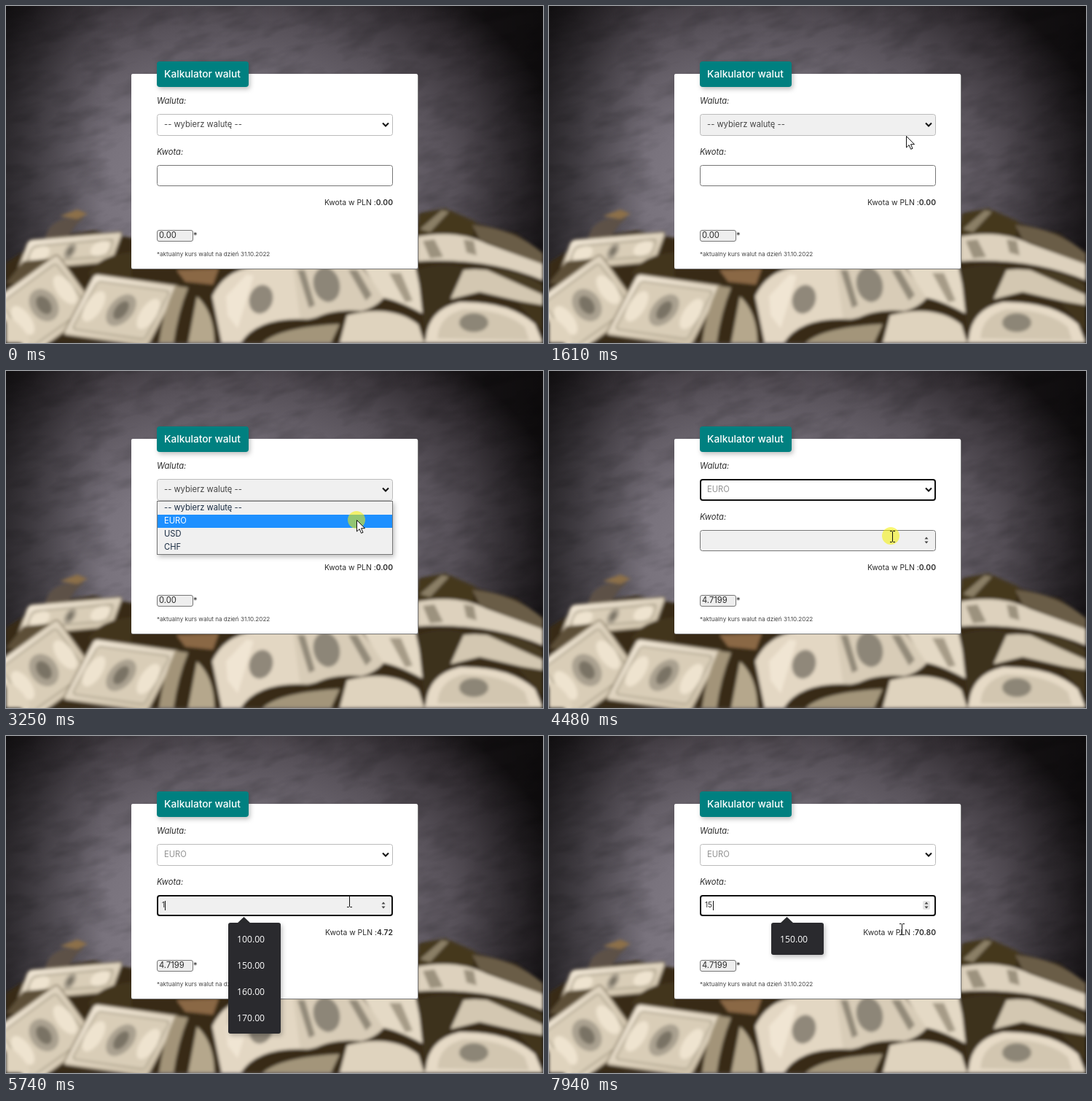
An HTML page for the animation above (8 s loop, 737x462 px).

```html
<!DOCTYPE html>
<html lang="pl">
<head>
<meta charset="utf-8">
<title>Kalkulator walut</title>
<style>
  html, body { margin: 0; width: 100%; height: 100%; overflow: hidden; background: #000; }
  svg { position: absolute; left: 0; top: 0; width: 737px; height: 462px; }
  #photo { will-change: transform; }
  text { font: 11.2px Inter, sans-serif; fill: #2b2b2b; white-space: pre; }
  .label { font-style: italic; }
  .small { font-size: 8.1px; fill: #444; }
  .title { font-size: 13.7px; font-weight: 500; fill: #fff; }
  .end { font-size: 10.4px; text-anchor: end; }
  .bold { font-weight: 600; }
  #typed { font-size: 10px; }
  #hints text { font: 12.2px "Open Sans", sans-serif; fill: #fff; }
  #list text { fill: #1a2c42; }
</style>
</head>
<body>
<svg id="photo" viewBox="0 0 737 462">
  <defs>
    <radialGradient id="wall" gradientUnits="userSpaceOnUse" cx="0" cy="0" r="1"
      gradientTransform="translate(300 250) scale(480 345)">
      <stop offset="0" stop-color="#8b858f"/><stop offset=".35" stop-color="#79737d"/>
      <stop offset=".65" stop-color="#58525a"/><stop offset=".88" stop-color="#302b30"/>
      <stop offset="1" stop-color="#151214"/>
    </radialGradient>
    <linearGradient id="edges">
      <stop offset="0" stop-opacity=".5"/><stop offset=".18" stop-opacity="0"/>
      <stop offset=".85" stop-opacity="0"/><stop offset="1" stop-opacity=".35"/>
    </linearGradient>
    <linearGradient id="paper" x2="1" y2="1">
      <stop offset="0" stop-color="#f1e7d6"/><stop offset="1" stop-color="#cdc0a8"/>
    </linearGradient>
    <filter id="soft" x="-5%" y="-5%" width="110%" height="110%"><feGaussianBlur stdDeviation="2.3"/></filter>
    <filter id="grain" x="0" y="0" width="100%" height="100%">
      <feTurbulence type="fractalNoise" baseFrequency=".02 .05" numOctaves="3" seed="4"/>
      <feColorMatrix values="0 0 0 0 0  0 0 0 0 0  0 0 0 0 0  1.6 0 0 0 -.65"/>
    </filter>
  </defs>
  <rect width="737" height="462" fill="url(#wall)"/>
  <rect x="-200" y="-200" width="1100" height="800" filter="url(#grain)" opacity=".22" transform="rotate(-14 368 231)"/>
  <rect width="737" height="462" fill="url(#edges)"/>
  <g id="money" filter="url(#soft)"></g>
</svg>

<svg id="ui" viewBox="0 0 737 462">
  <defs>
    <filter id="shade" x="-20%" y="-20%" width="140%" height="160%">
      <feDropShadow dx="2" dy="3" stdDeviation="3" flood-opacity=".25"/>
    </filter>
  </defs>
  <rect x="172" y="94" width="394" height="267" rx="2" fill="#777"/>
  <rect x="172" y="93" width="393" height="267" rx="2" fill="#fff"/>
  <rect x="207" y="76" width="126" height="35" rx="4" fill="teal" filter="url(#shade)"/>
  <text class="title" x="217" y="98">Kalkulator walut</text>
  <text class="label" x="207" y="134">Waluta:</text>
  <rect id="select" rx="3"/>
  <text id="choice" x="217" y="166"></text>
  <path d="M517 160.500l4 4 4-4" fill="none" stroke="#111" stroke-width="2"/>
  <text class="label" x="207" y="204">Kwota:</text>
  <rect id="input" rx="3"/>
  <rect id="spinBox" x="513" y="226" width="10" height="12" rx="2" fill="#e6e6e6"/>
  <path id="spin" d="M515.500 230.500l2.500-3 2.500 3zM515.500 233.500l2.500 3 2.500-3z" fill="#444"/>
  <text id="typed" x="214" y="235"></text>
  <path id="caret" d="M.500 226v13" stroke="#111"/>
  <text class="end" x="531" y="273">Kwota w PLN :<tspan id="sum" class="bold"></tspan></text>
  <rect x="207.500" y="307.500" width="49" height="15" rx="2.500" fill="#eee" stroke="#767676"/>
  <text id="rate" x="210" y="318"></text>
  <text x="257" y="319">*</text>
  <text class="small" x="207" y="343">*aktualny kurs walut na dzień 31.10.2022</text>

  <g id="list">
    <rect x="207.500" y="178.500" width="323" height="73" fill="#f0f0f0" stroke="#777" filter="url(#shade)"/>
    <rect id="mark" x="208" width="322" height="18" fill="#1e90ff"/>
  </g>
  <g id="hints">
    <path d="M317 257l9.500-9 9.500 9z" fill="#292a2d"/>
    <rect id="hintBox" x="305" y="256" width="72" rx="3" fill="#292a2d" filter="url(#shade)"/>
  </g>
  <circle id="click" r="12" fill="#f4f000" fill-opacity=".55"/>
  <path id="arrow" d="M.500.500v15.500l3.600-3.400 2.500 5.700 2.400-1-2.500-5.600h5z" fill="#fff" stroke="#111"/>
  <path id="beam" d="M-3-7.500h2.500l1 1 1-1H4M.500-7v14M-3 7.500h2.500l1-1 1 1H4" fill="none" stroke="#111"/>
</svg>

<script>
const $ = id => document.getElementById(id);
const set = (el, attrs) => { for (const k in attrs) el.setAttribute(k, attrs[k]); };
const add = (parent, tag, attrs, text = "") => {
  const el = document.createElementNS("http://www.w3.org/2000/svg", tag);
  set(el, attrs);
  el.textContent = text;
  return parent.appendChild(el);
};
const show = (id, on) => set($(id), { visibility: on ? "visible" : "hidden" });

// Blurred heap of banknotes
const heap = (d, fill) => add($("money"), "path", { d, fill });
const note = (x, y, w, h, turn, skew = 0) => {
  const g = add($("money"), "g", { transform: `translate(${x} ${y}) rotate(${turn}) skewX(${skew})` });
  const frame = (inset, fill, stroke) => add(g, "rect", {
    x: inset - w / 2, y: inset - h / 2, width: w - 2 * inset, height: h - 2 * inset, rx: 5, fill, stroke, "stroke-width": 2
  });
  frame(0, "url(#paper)", "#8a7d66");
  frame(9, "#d9cdb7", "#aaa08a");
  add(g, "ellipse", { rx: h * .2, ry: h * .26, fill: "#aaa190" });
  add(g, "ellipse", { rx: h * .1, ry: h * .15, fill: "#7a7365" });
  for (const s of [-1, 1]) add(g, "ellipse", { cx: s * w * .32, rx: w * .1, ry: h * .25, fill: "#eee3cf" });
};
heap("M0 352L25 336 62 316 120 308 172 318H560L568 284 600 278 646 298 700 312 737 338V462H0z", "#372b19");
heap("M54 318Q58 298 80 292L108 290 96 300 84 318z", "#5d5146");
heap("M74 288l24-9 14 6-14 7z", "#8c7048");
note(88, 336, 130, 40, -5, -25);
heap("M112 368Q130 340 172 338V374z", "#43361f");
heap("M0 380L24 350 62 346 30 382z", "#5d5039");
note(52, 410, 112, 92, -36, 0);
heap("M0 424Q26 438 34 462H0z", "#dfd3bd");
note(158, 417, 118, 88, 8, -20);
heap("M234 362L292 360 284 382 246 378z", "#8a6745");
heap("M232 384Q215 420 210 462H230Q236 420 250 386z", "#a39479");
heap("M262 398Q286 420 286 462H250z", "#b5a78c");
heap("M283 398Q300 362 340 358H396L410 432Q360 436 330 462H296z", "#e3d7c3");
heap("M302 398L330 368 340 370 318 442 304 424z", "#f0e5d3");
add($("money"), "ellipse", { cx: 350, cy: 402, rx: 16, ry: 20, fill: "#90887a", transform: "rotate(18 350 402)" });
heap("M394 358H488L520 398Q500 424 456 420L404 432z", "#d8ccb7");
add($("money"), "ellipse", { cx: 440, cy: 382, rx: 18, ry: 24, fill: "#8d8678", transform: "rotate(-14 440 382)" });
heap("M400 362l10 0 14 48-8 4zM470 362l12 0 20 34-8 8z", "#938a79");
heap("M490 358H562L576 424Q540 404 518 400z", "#e4d9c5");
heap("M526 366l16 0 16 38-10 2z", "#a69b87");
heap("M322 462Q346 424 420 430 452 412 500 420L520 462z", "#392c17");
heap("M352 462Q376 440 458 436L446 462z", "#a3957a");
heap("M468 424Q530 408 566 437L574 462H458z", "#dfd3be");
heap("M566 286L602 277 645 296 640 318 566 316z", "#44381f");
heap("M568 306l30-26 10 2-26 28z", "#8b7f66");
heap("M565 316Q620 306 660 326L737 354V376Q660 344 565 350z", "#ddd1bd");
heap("M572 322l16-2 12 24-18 2zM628 320l14 2 4 20-14-4z", "#9c927e");
heap("M640 300Q700 306 737 340V354L650 320z", "#6b5d46");
heap("M565 362Q600 348 640 362L604 410 574 444z", "#3d311c");
heap("M628 362Q680 356 737 390V412L650 392 610 402z", "#d3c7b1");
heap("M656 360Q710 362 737 384V396z", "#463a24");
heap("M576 456Q580 416 622 406 690 404 726 436L737 462H574z", "#e6dac6");
heap("M592 456Q594 424 628 416 684 416 712 440L718 458z", "#d2c6b0");
add($("money"), "ellipse", { cx: 642, cy: 434, rx: 20, ry: 13, fill: "#8d8677" });
heap("M700 404L737 410V446z", "#42361f");

const rows = ["-- wybierz walutę --", "EURO", "USD", "CHF"].map((s, i) =>
  add($("list"), "text", { x: 217, y: 191 + 18 * i }, s));
const hints = ["100.00", "150.00", "160.00", "170.00", "200.00", "50.00"].map(s =>
  add($("hints"), "text", { x: 317 }, s));

// Pointer moves: start, end, steps, target x, target y
const moves = [
  [590, 800, 4, 607, 283], [1060, 1750, 11, 486, 174], [2370, 3050, 11, 481, 204],
  [3780, 4140, 6, 471, 227], [6870, 7410, 8, 484, 265]
];
function pointer(t) {
  let x = 687, y = 430;
  for (const [from, to, steps, tx, ty] of moves) {
    if (t < from) break;
    const k = Math.min(steps, 1 + Math.floor((t - from) / (to - from) * (steps - 1) + .05));
    const p = 1 - (1 - k / steps) ** (from === 590 ? 1.2 : 2);
    x += (tx - x) * p;
    y += (ty - y) * p;
  }
  return [Math.round(x), Math.round(y)];
}

function field(id, y, h, focus, hover, border) {
  const o = focus ? 1 : .5;
  set($(id), {
    x: 207 + o, y: y + o, width: 324 - 2 * o, height: h - 2 * o,
    stroke: focus ? "#101010" : border, "stroke-width": 2 * o, fill: hover ? "#f0f0f0" : "#fff"
  });
}

function draw(t) {
  const [x, y] = pointer(t);
  const open = t >= 1970 && t < 3315, chosen = t >= 3315;
  const focus = t >= 4540, text = t < 5740 ? "" : t < 5800 ? "1" : "15";
  const overInput = chosen && y >= 218 && y < 247, beam = chosen && y >= 218;
  const lit = (t >= 1900 && t < 2040) || (t >= 3250 && t < 3380) || (t >= 4410 && t < 4610);

  field("select", 148, 30, chosen && !focus, open || (x < 531 && y <= 178), "#bbb");
  field("input", 218, 29, focus, overInput, "#767676");
  $("choice").textContent = rows[+chosen].textContent;
  $("choice").style.fill = chosen ? "#929292" : "#444";
  $("rate").textContent = chosen ? "4.7199" : "0.00";
  $("typed").textContent = text;
  $("sum").textContent = (4.7199 * text).toFixed(2);

  show("spin", overInput || focus);
  show("spinBox", focus && beam && !overInput);
  const blinkFrom = text ? 5800 : 4540;
  show("caret", focus && (t < blinkFrom || Math.floor((t - blinkFrom) / 534) % 2 === 0));
  set($("caret"), { transform: `translate(${[215, 218, 225][text.length]} 0)` });

  show("list", open);
  const row = y >= 197 ? 1 : 0;
  set($("mark"), { y: 179 + 18 * row });
  rows.forEach((el, i) => el.style.fill = i === row ? "#fff" : "");

  show("hints", focus);
  let n = 0;
  for (const el of hints) {
    const fits = el.textContent.startsWith(text);
    el.style.display = fits ? "" : "none";
    if (fits) set(el, { y: 283 + 36 * n++ });
  }
  set($("hintBox"), { height: 8 + 36 * n });

  show("click", lit);
  set($("click"), { cx: beam ? x - 2 : x, cy: beam ? y - 1 : y });
  for (const id of ["arrow", "beam"]) {
    show(id, t >= 590 && (id === "beam") === beam);
    set($(id), { transform: `translate(${x} ${y})` });
  }
}

const start = performance.now();
(function tick() {
  draw((performance.now() - start) % 8000);
  requestAnimationFrame(tick);
})();
</script>
</body>
</html>
```
